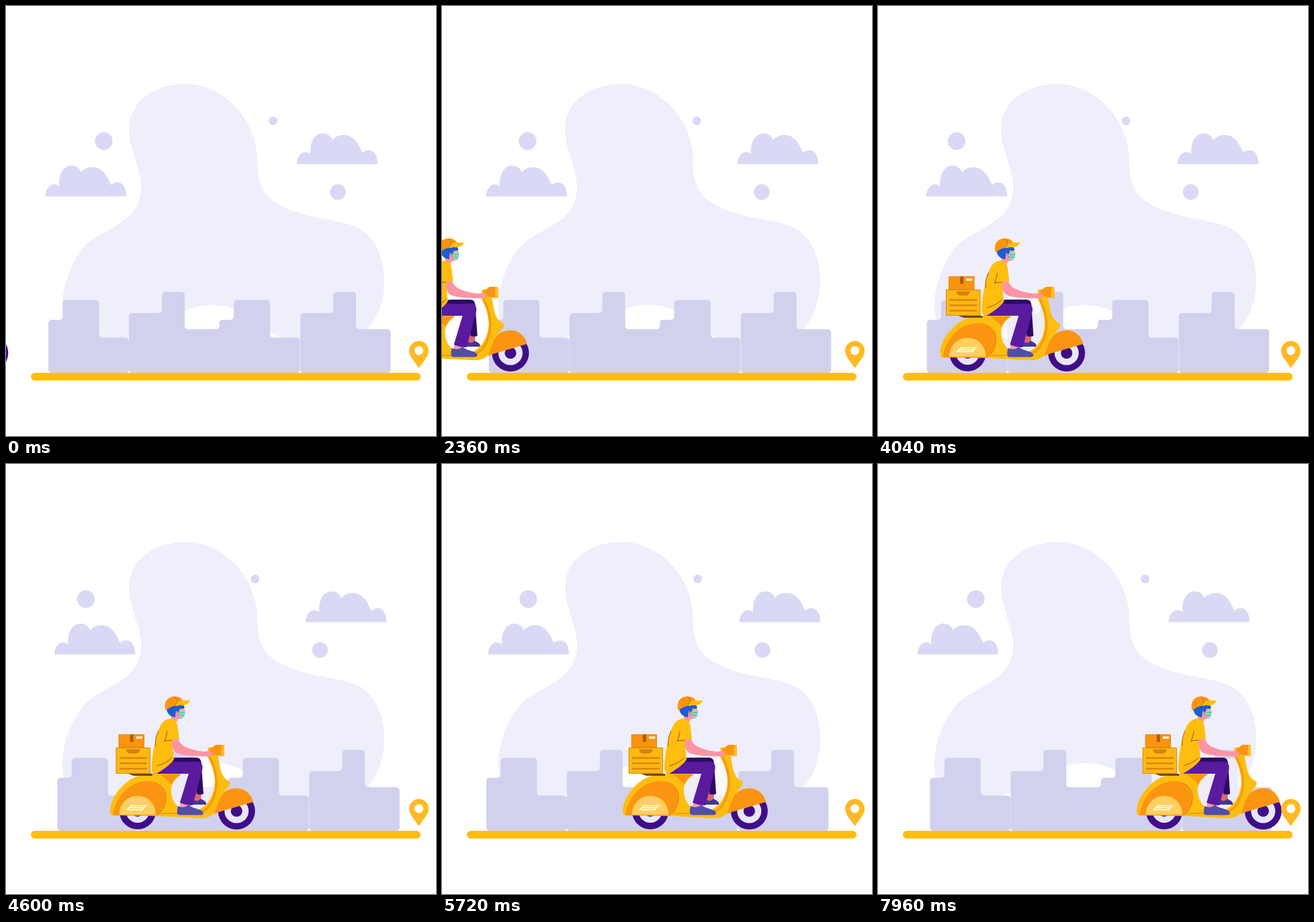
These frames come from a looping animation (640x640 px, 8020 ms). An HTML page:

```html
<!DOCTYPE html>
<html lang="en">
<head>
<meta charset="utf-8">
<title>Delivery scooter</title>
<style>
  html, body { margin: 0; width: 100%; height: 100%; overflow: hidden; background: #fff; }
  svg { display: block; width: 100%; height: 100%; }
  .pale { fill: #dad9f5; }
  .town { fill: #d2d1ed; }
  .yellow { fill: #ffbd10; }
  .orange { fill: #fb9511; }
  .purple { fill: #3f0e86; }
  .skin { fill: #fd94a4; }
  .line { fill: none; stroke-linecap: round; stroke-linejoin: round; }
</style>
</head>
<body>
<svg viewBox="0 0 640 640" xmlns="http://www.w3.org/2000/svg">
  <defs>
    <path id="cloud" d="M0 0C0-10 6-18 13-18C16-18 19-17 20.500-15C19-33 27-46 39-46C46-46 51-42 53.500-36C57-41 63-43.500 70-43.500C82-43.500 88-36 92-29C95-24 96-20 98.500-17C101-20 104-21 107-21C115-21 120.500-14 120.500 0Z"/>
    <linearGradient id="pinFill" x1="0" y1="0" x2="1" y2="0">
      <stop offset=".3" stop-color="#ffb729"/>
      <stop offset="1" stop-color="#ffbf16"/>
    </linearGradient>
  </defs>

  <path fill="#efeefb" d="M267 116C325 116 374 170 374 232C374 262 380 280 405 295C450 320 495 315 525 331C552 345 563 378 563 410C563 440 552 467 535 484C500 512 440 515 395 486C365 460 340 445 308 445C285 445 262 453 245 465C200 500 90 520 85 460C80 425 95 385 115 360C140 331 201 325 201 270C201 240 183 215 183 183C183 142 222 116 267 116Z"/>

  <g id="clouds" class="pale">
    <use href="#cloud" x="58.500" y="283.500"/>
    <use href="#cloud" x="432.500" y="235.500"/>
  </g>
  <g id="dots" class="pale">
    <circle cx="145.500" cy="201" r="13.200"/>
    <circle cx="397.500" cy="171" r="6.500"/>
    <circle cx="494" cy="277" r="11.700"/>
  </g>
  <g id="town" class="town"></g>
  <rect class="yellow" x="37" y="546" width="580" height="11.500" rx="5.700"/>

  <g id="bike">
    <!-- wheels -->
    <circle class="purple" cx="70" cy="516.500" r="27.200"/>
    <circle cx="70" cy="516.500" r="17.500" fill="#e9e6fa"/>
    <circle class="purple" cx="70" cy="516.500" r="8.500"/>
    <circle class="purple" cx="217.300" cy="516.500" r="27.500"/>
    <circle cx="217.300" cy="516.500" r="18" fill="#e9e6fa"/>
    <circle class="purple" cx="217.300" cy="516.500" r="8.600"/>

    <!-- opening behind the legs -->
    <path fill="#fff" opacity=".6" d="M118 462L128 441L178 437L188 470L178 508L160 520L130 518L117 495Z"/>

    <!-- frame -->
    <path class="yellow" d="M29 517C29 500 43 479 62 468C70 464 80 462 90 461L135 461C127 468 121 474 120 483C119 496 125 508 135 514C145 518 160 517 167 511C181 501 187 480 184 464C182 450 177 441 172 432L177 422L188 426L193 453C195 463 200 469 206 472C209 475 208 478 204 482C194 493 193 505 186 517C181 525 172 528 160 527L103 524L32 523Q29 522 29 517Z"/>
    <path class="line" stroke="#f59c12" stroke-width="3.500" d="M178 437C190 463 191 485 178 507C172 517 160 520 147 520"/>
    <path class="orange" d="M104 462H135C127 466 123 471 121 477C115 471 109 466 104 462Z"/>
    <path class="orange" d="M33 521C38 494 59 472 85 472C104 472 113 484 112 499C111 510 106 519 98 523H34Z"/>
    <path class="line" stroke="#c97a10" stroke-width=".8" d="M98 475C109 480 113 488 112 499C111 511 106 518 99 522M104 520H130"/>
    <path fill="#ffcf60" d="M42.500 522C43 505 55 494 70 494C86 494 97 506 97 522Z"/>
    <path class="line" stroke="#fff" stroke-width="1.600" d="M60 508.500H83M57 511.500H80M54 514.500H77M62 508L54 514.500M82 508.500L76 515"/>
    <path class="orange" d="M184 521C188 509 191 498 198 490C204 484 213 482 222 483C233 485 240 494 242 503L191 518Z"/>

    <!-- load -->
    <path fill="#6b4a20" d="M56 461H92V464H64Z"/>
    <rect x="38" y="422" width="51" height="39" fill="#fcb813"/>
    <path class="line" stroke="#d98b12" stroke-width="1" d="M38.500 422.500H88.500V460.500H38.500Z"/>
    <path fill="#d9820e" d="M53 424.500H74C73 429 70 431 67 431H60C56 431 54 429 53 424.500Z"/>
    <path class="line" stroke="#da860c" stroke-width="2.600" d="M44 437.500H83M44 445.500H83M44 453.500H83"/>
    <rect x="42" y="402.500" width="38" height="19.500" fill="#f9940f"/>
    <path class="line" stroke="#df8c1c" stroke-width="1" d="M42.500 403H79.500V421.500H42.500Z"/>
    <rect x="58.800" y="402.500" width="5" height="11" fill="#a95d0d"/>
    <rect x="68" y="405.500" width="9" height="3.500" rx=".6" fill="#fff2d8"/>

    <!-- far leg -->
    <path fill="#dc6473" d="M154 488H165L164 502L153 501Z"/>
    <path fill="#2d0a63" d="M112 443C117 438 124 437 131 437H157C163 437 165 441 165 447L168 491Q163 493 158 491L153 455L112 450Z"/>
    <path fill="#46358f" d="M152 499C158 503 162 501 164 498C167 501 173 501 172 507H151Z"/>

    <!-- near leg -->
    <path class="skin" d="M134 502H148L146 513H133Z"/>
    <path fill="#5a1a9e" d="M94 461C103 453 110 447 118 442C128 444 145 443 158 443C165 443 168 448 166 456L152 508Q142 508 133 504L146 461Z"/>
    <path fill="#504fa8" d="M130 509C137 512 142 511 146 507C152 514 164 512 168 519Q168 522.500 163 522.500H132Q128 522 129 515Z"/>

    <!-- column and lamp -->
    <path class="yellow" d="M174 423Q180 419 184 425L190 445L180 438Z"/>
    <path class="orange" d="M177 425L186 418H198Q199 418 199 420V434Q199 435 197 435L186 433L178 430Z"/>
    <path fill="#ffbf24" d="M195 418H198Q199 418 199 420V434Q199 435 197 435L194 434.500Z"/>
    <path class="line" stroke="#4a1350" stroke-width="3" d="M171 432.500H180"/>

    <!-- rider -->
    <path class="skin" d="M119 369H132L129 383L121 385Z"/>
    <path class="skin" d="M118 409L130 407C132 414 135 418 141 421C153 426 163 428 171 428C177 426 182 428 182 432C181 435 176 435 171 435C156 435 141 434 130 431C123 428 120 419 118 409Z"/>
    <path class="yellow" d="M121 379C111 379 105 385 102 394C96 412 91 431 91 455Q92 461 98 461C108 455 117 449 124 440L121 411L132 409C130 399 131 390 127 382Z"/>
    <path class="line" stroke="#8c5a10" stroke-width="1" d="M101 397C97 406 96 412 97 419M114 398C113 405 111 411 110 413M110 412L121 411M99 449C107 447 115 443 121 437"/>
    <path class="skin" d="M124 361H138L141 369L138 378L130 380L123 375Z"/>
    <path fill="#1f5bd2" d="M113 362C113 371 118 376 126 377L127 367L131 370L133 364L140 363L138 358H116Z"/>
    <path fill="#8fdcc2" d="M131 369L136 365L141 367L140 375Q138 379 133 377Z"/>
    <path class="line" stroke="#2f9d7d" stroke-width=".8" d="M127 368L132 374M133 370L140 370M133 374L139 374"/>
    <path class="line" stroke="#33245f" stroke-width="1" d="M135 363.500L139 362.800"/>
    <path class="orange" d="M112 367C108 357 113 346 125 346C133 346 137 349 138 354L130 360C123 359 117 363 112 367Z"/>
    <path class="yellow" d="M126 360C128 355 134 351 139 352H148C146 358 139 360 133 359Z"/>
    <path class="line" stroke="#b96d0c" stroke-width=".9" d="M125 346.500C130 349 131 353 126 359"/>
  </g>

  <path fill="url(#pinFill)" d="M614.500 539C607 528 600 521 600 513A14.500 14.500 0 0 1 629 513C629 521 622 528 614.500 539Z"/>
  <circle cx="614.500" cy="512.800" r="6.600" fill="#fff"/>
</svg>
<script>
  const LOOP = 8020, LEAD = 120, TICK = 112, END = 7970;
  const el = id => document.getElementById(id);

  // Closed outline through the points, every corner rounded
  function rounded(pts, r = 5.5) {
    const toward = (a, b) => {
      const k = Math.min(r / Math.hypot(b[0] - a[0], b[1] - a[1]), 0.5);
      return [a[0] + (b[0] - a[0]) * k, a[1] + (b[1] - a[1]) * k];
    };
    const n = pts.length;
    return pts.map((p, i) =>
      `${i ? 'L' : 'M'}${toward(p, pts[(i + n - 1) % n])}Q${p} ${toward(p, pts[(i + 1) % n])}`
    ).join('') + 'Z';
  }

  const BASE = 546;
  const low = x => [[x, 467], [x + 21.5, 467], [x + 21.5, 437.5], [x + 75.5, 437.5],
    [x + 75.5, 493.5], [x + 120, 493.5]];
  const high = x => [[x, 457], [x + 49, 457], [x + 49, 425.5], [x + 83, 425.5],
    [x + 83, 481], [x + 134.5, 481]];

  function block(tops) {
    const d = rounded([...tops, [tops.at(-1)[0], BASE], [tops[0][0], BASE]]);
    el('town').insertAdjacentHTML('beforeend', `<path d="${d}"/>`);
  }
  block(low(63));
  block([...high(183), ...low(317.5)]);
  block(high(438));

  const clamp = u => Math.max(0, Math.min(1, u));
  const ease = u => u * u * (3 - 2 * u);

  // Eased moves between [time, value] stops
  function eased(keys, t) {
    const i = Math.max(1, keys.findIndex(k => k[0] > t));
    if (t >= keys.at(-1)[0]) return keys.at(-1)[1];
    const [t0, a] = keys[i - 1], [t1, b] = keys[i];
    return a + (b - a) * ease(clamp((t - t0) / (t1 - t0)));
  }

  // Smooth curve through [time, value] stops
  function curve(keys, t) {
    const last = keys.length - 1;
    if (t >= keys[last][0]) return keys[last][1];
    const i = keys.findIndex(k => k[0] > t) - 1;
    const slope = j => {
      const a = keys[Math.max(0, j - 1)], b = keys[Math.min(last, j + 1)];
      return (b[1] - a[1]) / (b[0] - a[0]);
    };
    const [t0, a] = keys[i], [t1, b] = keys[i + 1];
    const h = t1 - t0, u = (t - t0) / h, v = 1 - u;
    return a * v * v * (1 + 2 * u) + b * ease(u) + h * u * v * (v * slope(i) - u * slope(i + 1));
  }

  const TOWN = [[0, 0], [1680, 13.8], [2980, 0.5], [4620, 13.3], [6150, 0.4], [7850, 14.3]];
  const CLOUDS = [[0, 0], [1200, 2.6], [2360, 7], [3480, 12], [4200, 13.5], [4600, 13.3],
    [5720, 10], [6840, 5.2], [7960, 0]];
  const DOTS = [[0, 0], [3985, -28.5], [END, 0]];

  const shift = (id, x) => el(id).setAttribute('transform', `translate(${x.toFixed(2)} 0)`);

  function draw(now) {
    const raw = now % LOOP;
    const t = raw < LEAD ? 0 : LEAD + TICK * Math.floor((raw - LEAD) / TICK);
    shift('bike', -241.5 + 597.5 * ease(clamp(t / END)));
    shift('town', eased(TOWN, t));
    shift('clouds', curve(CLOUDS, t));
    shift('dots', eased(DOTS, t));
  }

  const start = performance.now();
  function loop() {
    draw(performance.now() - start);
    requestAnimationFrame(loop);
  }
  loop();
</script>
</body>
</html>
```
